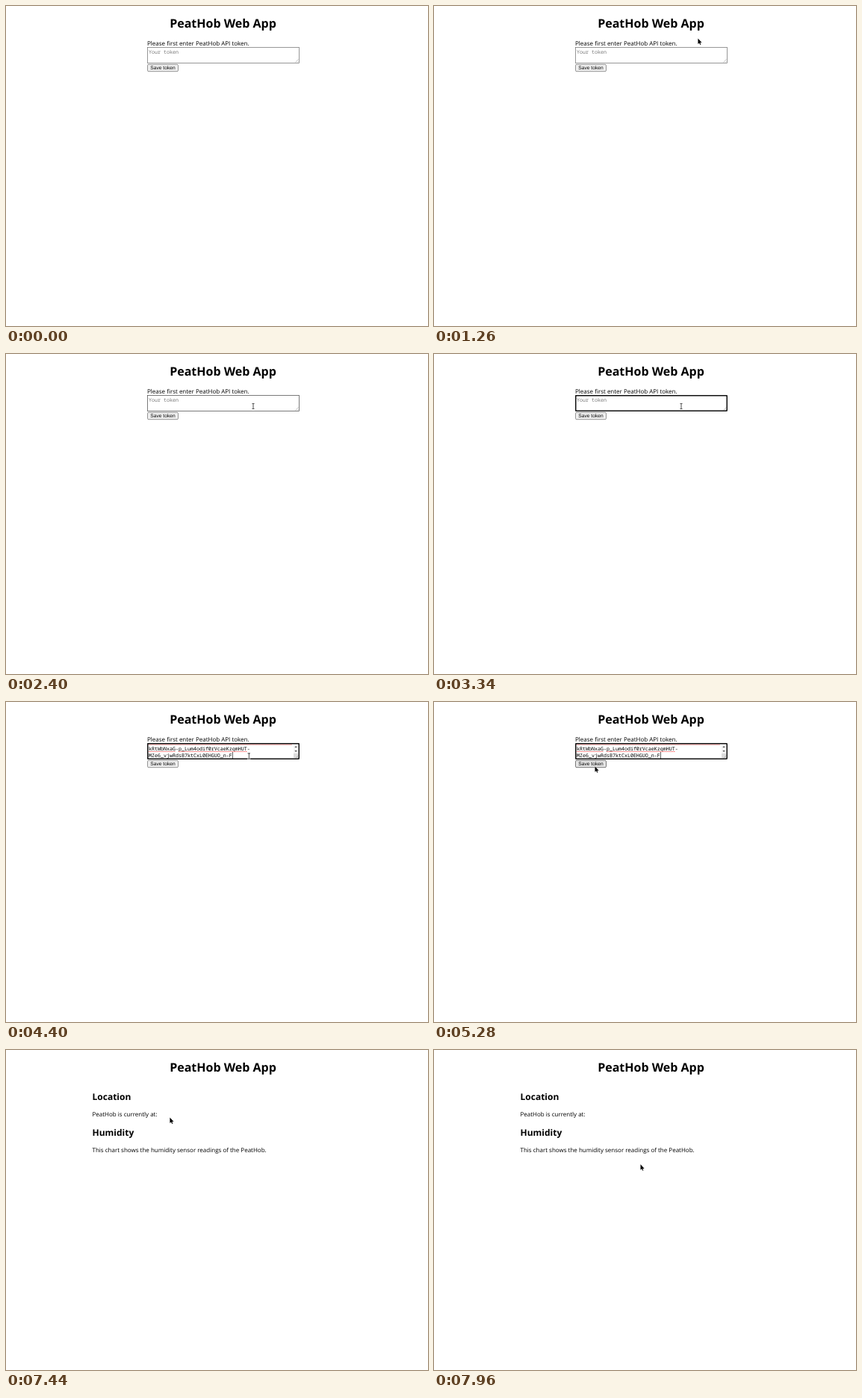
An HTML page for the animation above (8 s loop, 565 px wide and 429 px high).

```html
<!DOCTYPE html>
<html lang="en">
<head>
<meta charset="utf-8">
<title>Token form</title>
<style>
  html, body { margin: 0; width: 100%; height: 100%; overflow: hidden; background: #fff; }
  svg { display: block; }
  text {
    font: 8px "Open Sans", "Noto Sans", sans-serif;
    text-rendering: geometricPrecision;
    white-space: pre;
  }
  .h1 { font-size: 16px; font-weight: 700; text-anchor: middle; }
  .h2 { font-size: 12px; font-weight: 700; }
  .mono { font: 6.667px "Noto Sans Mono", "DejaVu Sans Mono", monospace; }
  .label { font: 6.667px "Liberation Sans", Arial, sans-serif; text-anchor: middle; }
  .hint { fill: #757575; }
  .grip { stroke: #999; stroke-width: .6; }
  .wavy { stroke: #f00; stroke-opacity: .55; stroke-dasharray: 1.5 .5; }
  .halo { stroke: #fff; stroke-width: 1; stroke-opacity: .85; paint-order: stroke; }

  #field, #button { stroke: #767676; stroke-width: .75; }
  #field { fill: #fff; }
  #button { fill: #efefef; }
  #field.hover, #button.hover { stroke: #4f4f4f; }
  #button.hover { fill: #e5e5e5; }
  #button.active { fill: #f5f5f5; stroke: #8d8d8d; }
  #ring { fill: none; stroke: #101010; stroke-width: 1.5; }
</style>
</head>
<body>
<svg width="565" height="429" viewBox="0 0 565 429">
  <text class="h1 ibeam" x="290.5" y="29">PeatHob Web App</text>

  <g id="form">
    <text class="ibeam" x="189" y="53">Please first enter PeatHob API token.</text>
    <rect id="field" class="ibeam" x="189.5" y="55.5" width="203" height="21"/>
    <text id="hint" class="mono hint" x="191" y="64">Your token</text>
    <g id="token">
      <text class="mono" x="191" y="65">kRtWbNxaG-p_Lum4odif0rVcaeKzqmHUT-</text>
      <text class="mono" x="191" y="74">MZe6_vjwRdsB7ktCxL0EHGUO_n-F</text>
      <path id="wavy" class="wavy" d="M191 57.2H383M191 66.5H227M231 66.5H323"/>
      <rect x="385" y="57" width="6" height="12" fill="#f4f4f4"/>
      <rect x="385" y="69" width="6" height="6" fill="#dcdcdc"/>
      <path d="M386.4 61l1.7-2 1.7 2zM386.4 65l1.7 2 1.7-2z" fill="#505050"/>
    </g>
    <path class="grip" d="M387.5 75.5l4-4M390 75.5l1.5-1.5"/>
    <rect id="caret" width=".6" height="9"/>
    <rect id="ring" x="189.75" y="55.75" width="202.5" height="20.5" rx="1.2"/>
    <rect id="button" x="189.5" y="78.3" width="41" height="9.4" rx="1.5"/>
    <text class="label" x="210" y="85.3">Save token</text>
  </g>

  <g id="page">
    <text class="h2 ibeam" x="115.5" y="67">Location</text>
    <text class="ibeam" x="115.5" y="89">PeatHob is currently at:</text>
    <text class="h2 ibeam" x="115.5" y="115">Humidity</text>
    <text class="ibeam" x="115.5" y="137">This chart shows the humidity sensor readings of the PeatHob.</text>
  </g>

  <g id="cursor">
    <path id="arrow" class="halo" d="M.5 .3V7.8L2.2 6.3L3.3 8.8L4.4 8.3L3.4 5.9H5.6Z"/>
    <path id="beam" class="halo" d="M-1.7-4H1.7V-3.4H.35V3.4H1.7V4H-1.7V3.4H-.35V-3.4H-1.7Z"/>
  </g>
</svg>

<script>
const LOOP = 8000, STEP = 20;
const ENTER = 740, FOCUS = 2740, PASTE = 4080, PRESS = 5820, SUBMIT = 5960, BLINK = 600;

// Each move starts where the last one ended; "via" bends it.
const home = [140, 0];
const moves = [
  { from: ENTER, until: 1540, via: [401, 20], to: [348, 68] },
  { from: 1540, until: 2400, via: [335, 121], to: [331, 70] },
  { from: 4320, until: 5000, via: [255, 104], to: [216, 88.5] },
  { from: 5140, until: 5280, to: [215, 86] },
  { from: 7160, until: 7200, to: [216, 87] },
  { from: 7360, until: 7960, to: [276, 153] }
];

const el = id => document.getElementById(id);
const show = (id, on) => { el(id).style.display = on ? "" : "none"; };
const smooth = k => k * k * (3 - 2 * k);
const bend = (a, b, c, u) => a * (1 - u) ** 2 + 2 * b * u * (1 - u) + c * u * u;

function pointer(t) {
  let pos = home;
  for (const { from, until, to, via } of moves) {
    if (t < from) break;
    const u = smooth(Math.min(1, (t - from) / (until - from)));
    pos = pos.map((a, i) => bend(a, via ? via[i] : (a + to[i]) / 2, to[i], u));
  }
  return pos;
}

function over(node, [px, py]) {
  const { x, y, width, height } = node.getBBox();
  return px >= x && px < x + width && py >= y && py < y + height;
}

function drawForm(t, pos) {
  const pasted = t >= PASTE, focused = t >= FOCUS && t < PRESS;
  const blinks = Math.floor((t - (pasted ? PASTE : FOCUS)) / BLINK);

  show("hint", !pasted);
  show("token", pasted);
  show("wavy", t >= PASTE + STEP);
  show("ring", focused);
  show("caret", focused && blinks % 2 === 0);
  el("caret").setAttribute("x", pasted ? 303 : 191);
  el("caret").setAttribute("y", pasted ? 67 : 57);
  for (const id of ["field", "button"]) {
    el(id).classList.toggle("hover", t >= ENTER && over(el(id), pos));
  }
  el("button").classList.toggle("active", t >= PRESS);
}

function draw(t) {
  const pos = pointer(t);
  show("form", t < SUBMIT);
  show("page", t >= SUBMIT);
  drawForm(t, pos);

  const onText = [...document.querySelectorAll(".ibeam")].some(node => over(node, pos));
  show("cursor", t >= ENTER);
  show("arrow", !onText);
  show("beam", onText);
  el("cursor").setAttribute("transform", `translate(${pos})`);
}

const start = performance.now();
function tick() {
  const t = (performance.now() - start) % LOOP;
  draw(Math.floor(t / STEP) * STEP);
  requestAnimationFrame(tick);
}
tick();
</script>
</body>
</html>
```
